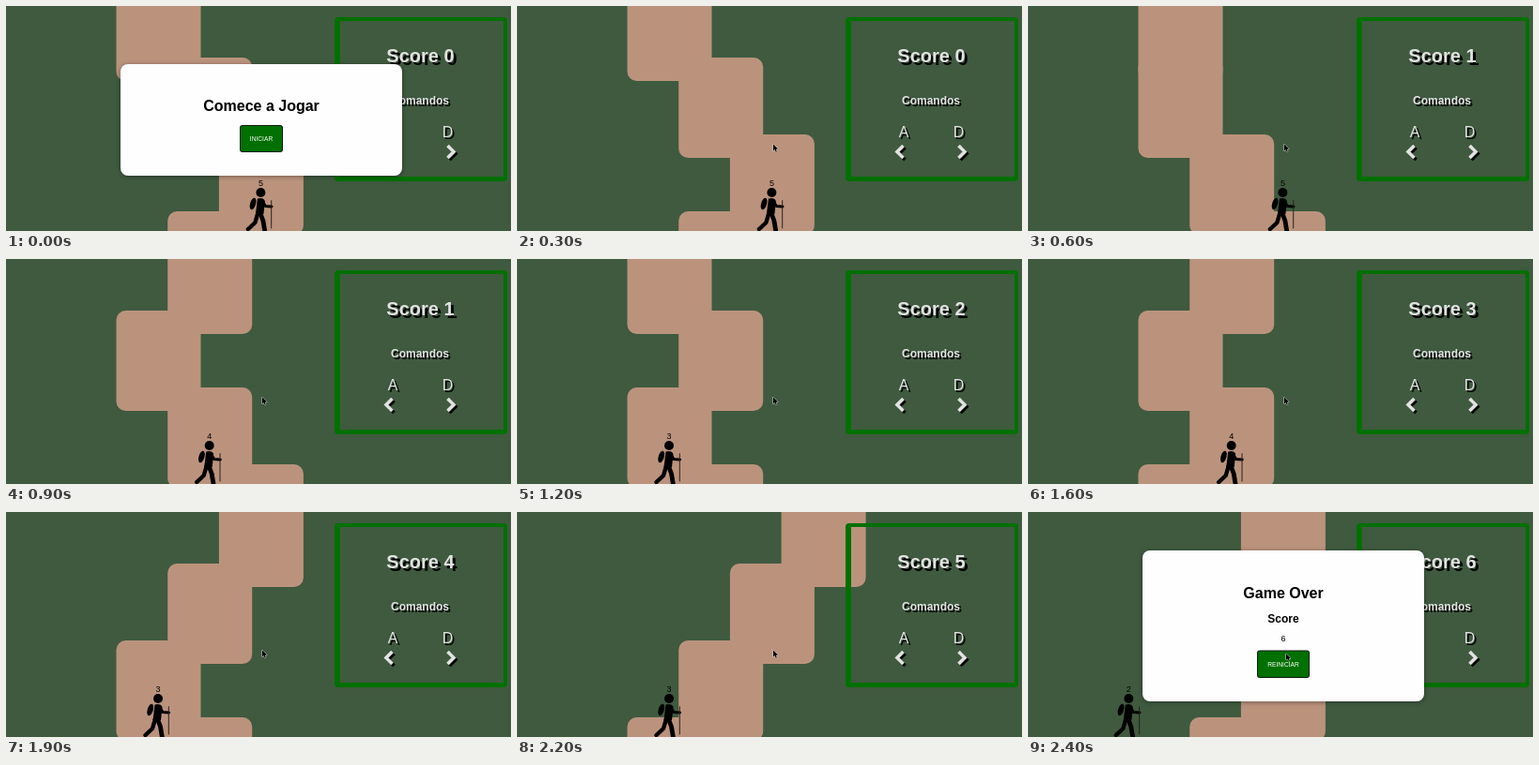
An HTML page with a canvas that plays this animation: 538 px wide and 240 px high, repeating every 2500 ms.

```html
<!DOCTYPE html>
<html lang="pt">
<head>
<meta charset="utf-8">
<title>Trilha</title>
<style>
  html, body { margin: 0; width: 538px; height: 240px; overflow: hidden; background: #3f5a3f; }
  canvas { display: block; }
</style>
</head>
<body>
<canvas id="stage" width="538" height="240"></canvas>
<script>
const ctx = document.getElementById('stage').getContext('2d');
const LOOP = 2500, STEP = 100;
const GROUND = '#3f5a3f', PATH = '#bb937d', GREEN = '#007000', LIGHT = '#e2e2e2';
const FONT = '"Liberation Sans", Arial, sans-serif';

// Lane of each path tile, from the bottom row upwards
const TRAIL = [4, 5, 4, 3, 4, 3, 4, 5, 6, 5];
// Hiker moves: [time, lane]
const MOVES = [[0, 5], [800, 4], [1100, 3], [1600, 4], [1800, 3], [2300, 2]];
const FIRST_TICK = 600, TICK = 340, SPAWN_LAG = 20;

const laneX = lane => 117.5 + (lane - 3) * 54.7;
const ticks = t => t < FIRST_TICK ? 0 : Math.min(6, 1 + Math.floor((t - FIRST_TICK) / TICK));

function box(x, y, w, h, r, color) {
  ctx.fillStyle = color;
  ctx.beginPath();
  ctx.roundRect(x, y, w, h, r);
  ctx.fill();
}

function label(text, x, y, size, color, weight = 'normal') {
  ctx.font = `${weight} ${size}px ${FONT}`;
  ctx.textAlign = 'center';
  ctx.fillStyle = color;
  ctx.fillText(text, x, y);
}

function raised(text, x, y, size, depth, weight) {
  label(text, x + depth, y + depth, size, '#000', weight);
  label(text, x, y, size, LIGHT, weight);
}

function line(points, width, color = '#000') {
  ctx.strokeStyle = color;
  ctx.lineWidth = width;
  ctx.beginPath();
  points.forEach(([x, y]) => ctx.lineTo(x, y));
  ctx.stroke();
}

function chevron(x, dir) {
  for (const [d, color] of [[2, '#000'], [0, LIGHT]]) {
    const tip = x + dir * 3.5 + d, end = x - dir * 3 + d;
    ctx.lineCap = 'butt';
    ctx.lineJoin = 'miter';
    line([[end, 149 + d], [tip, 155.5 + d], [end, 162 + d]], 3.6, color);
  }
}

function drawPath(t) {
  for (let row = 0; row < 4; row++) {
    const n = ticks(row === 3 ? t - SPAWN_LAG : t);
    box(laneX(TRAIL[n + row]), 219 - row * 82, 90, 107, 10, PATH);
  }
}

function drawHiker(lane) {
  ctx.save();
  ctx.translate(laneX(lane) + 45, 0);
  label(lane, -0.5, 192, 9, '#000');
  ctx.lineCap = ctx.lineJoin = 'round';
  ctx.fillStyle = '#000';
  ctx.beginPath();
  ctx.arc(-0.5, 199, 5, 0, 7);
  ctx.fill();
  // torso
  ctx.beginPath();
  ctx.moveTo(-4, 205.5);
  ctx.quadraticCurveTo(2, 203.5, 4, 208);
  ctx.lineTo(2.5, 222);
  ctx.lineTo(-6, 222);
  ctx.closePath();
  ctx.fill();
  // backpack
  ctx.beginPath();
  ctx.ellipse(-8.8, 211, 3, 6.5, 0.28, 0, 7);
  ctx.fill();
  line([[1, 208], [4.5, 213.5], [11, 214]], 3.2);
  line([[-1, 221], [2, 229], [4, 241]], 4.8);
  line([[-3.6, 221], [-6.5, 231], [-14, 238]], 4.4);
  line([[10.8, 207.5], [10.8, 237]], 1, '#2b211c');
  ctx.restore();
}

function drawPanel(score) {
  ctx.fillStyle = GREEN;
  ctx.beginPath();
  ctx.roundRect(350, 12, 184, 175, 4);
  ctx.rect(356, 16, 174, 166);
  ctx.fill('evenodd');
  raised('Score ' + score, 441.5, 60, 20, 3, 'bold');
  raised('Comandos', 441, 105, 12, 2, 'bold');
  raised('A', 412, 139.5, 16, 2);
  raised('D', 470.5, 139.5, 16, 2);
  chevron(408.5, -1);
  chevron(473.5, 1);
}

function card(y, h) {
  ctx.save();
  ctx.shadowColor = 'rgba(0,0,0,.4)';
  ctx.shadowBlur = 5;
  ctx.shadowOffsetY = 1;
  box(122, y, 300, h, 8, '#fefefe');
  ctx.restore();
}

function button(text, x, y, w, h) {
  box(x, y, w, h, 3, '#0a1a0a');
  box(x + 1, y + 1, w - 2, h - 2, 2, GREEN);
  label(text, 272, y + h / 2 + 2.4, 6.67, '#fff');
}

function drawStart() {
  card(62, 119);
  label('Comece a Jogar', 272, 112, 16, '#000', 'bold');
  button('INICIAR', 249, 127, 46, 29);
}

function drawOver(score) {
  card(41, 161);
  label('Game Over', 272, 92, 16, '#000', 'bold');
  label('Score', 272, 117.5, 12, '#000', 'bold');
  label(score, 272, 138, 9, '#000');
  button('REINICIAR', 244, 147.5, 56, 29.5);
}

function drawCursor(x, y) {
  ctx.beginPath();
  [[0, 0], [0, 7], [1.6, 5.6], [2.8, 8.2], [3.9, 7.7], [2.8, 5.2], [5, 5.1]]
    .forEach(([dx, dy]) => ctx.lineTo(x + dx, y + dy));
  ctx.closePath();
  ctx.lineJoin = 'round';
  ctx.lineWidth = 1;
  ctx.strokeStyle = '#ddd';
  ctx.stroke();
  ctx.fillStyle = '#000';
  ctx.fill();
}

function draw(t) {
  const score = ticks(t);
  const lane = MOVES.filter(m => m[0] <= t).pop()[1];
  const over = t >= 2400;
  ctx.fillStyle = GROUND;
  ctx.fillRect(0, 0, 538, 240);
  drawPath(t);
  drawHiker(lane);
  drawPanel(score);
  if (t < 200) drawStart();
  if (over) drawOver(score);
  if (t >= 100) over ? drawCursor(275, 151) : drawCursor(273, 147.5);
}

const start = performance.now();
function loop() {
  const t = (performance.now() - start) % LOOP;
  draw(Math.floor(t / STEP) * STEP);
  requestAnimationFrame(loop);
}
loop();
</script>
</body>
</html>
```
